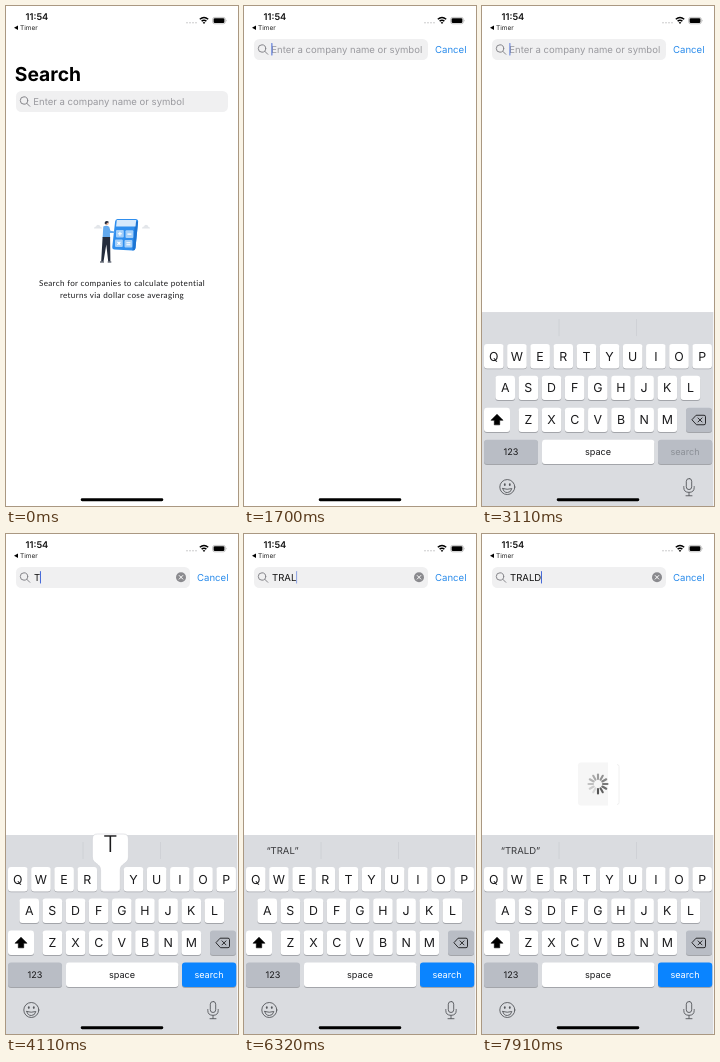
Write an HTML page that moves like this. It is 232 px wide and 500 px high and loops after 8000 ms.

```html
<!DOCTYPE html>
<html lang="en">
<head>
<meta charset="utf-8">
<title>Company search</title>
<style>
  html, body { margin: 0; width: 100%; height: 100%; overflow: hidden; background: #fff; }
  svg { display: block; width: 100%; height: 100%; font-family: Inter, "Liberation Sans", sans-serif; }
  text { text-rendering: geometricPrecision; }
  .mid { text-anchor: middle; }
  .intro { font: 8.1px Lato, sans-serif; letter-spacing: .32px; fill: #1c1c1e; }
  .body { font-size: 9.55px; }
</style>
</head>
<body>
<svg id="stage" viewBox="0 0 232 500">
  <rect width="232" height="500" fill="#fff"/>

  <g id="intro">
    <g fill="#e3e6ea">
      <path d="M88 222.500q0-2 2-2 .6-2 2.600-1.600 1.600.2 1.700 1.800 1.700 0 1.700 1.800z"/>
      <path d="M136 222.500q0-2 2-2 .6-2 2.600-1.600 1.600.2 1.700 1.800 1.700 0 1.700 1.800z"/>
    </g>
    <path d="M111.500 213h18q2.800 0 2.600 2.600l-2.600 26.500q-.3 2.700-3 2.500l-18-1.200q-2.500-.2-2.200-2.700l2.800-25.200q.3-2.500 2.400-2.500z" fill="#2f8eee"/>
    <path d="M132.100 215.500l-2.600 26.600q-.3 2.700-3 2.500l2.600-29z" fill="#1d74d2"/>
    <path d="M110.800 214h19.400l-.7 6.500h-19.400z" fill="#d6e9fc"/>
    <g fill="#a3cffa">
      <rect x="110" y="224" width="7.800" height="7.600" rx="1"/>
      <rect x="119.500" y="224.300" width="7.800" height="7.600" rx="1"/>
      <rect x="109" y="233.500" width="7.800" height="7.600" rx="1"/>
      <rect x="118.500" y="234" width="7.800" height="7.600" rx="1"/>
    </g>
    <path d="M111.900 227.800h4M113.900 225.800v4M121.400 228.100h4M111.400 235.800l3 3M114.400 235.800l-3 3M120.400 236.800h4M120.400 238.800h4" stroke="#fff" stroke-width="1.100" fill="none"/>
    <circle cx="100.800" cy="217.300" r="1.900" fill="#e8b9a0"/>
    <path d="M98.700 217.500q-.2-2.700 2.300-2.600 2 .1 1.800 1.700-2.200-.3-2.600 2z" fill="#232b3e"/>
    <path d="M97.300 220.500q3-1.400 5.900.2l1.200 4 4.400.9-.4 1.500-4.500-.1.200 5h-7.500z" fill="#62a9ee"/>
    <path d="M96.600 231h7.500l.3 24.500h-2.200l-1.900-17-2.800 17h-2.300z" fill="#242c3c"/>
    <path d="M94 256h4M101.700 256h3.600" stroke="#242c3c" stroke-width="1.200"/>
    <text class="mid intro" x="116" y="280.400">Search for companies to calculate potential</text>
    <text class="mid intro" x="116" y="291.900">returns via dollar cose averaging</text>
  </g>

  <text id="title" x="8.800" y="75" font-size="19.300" font-weight="700">Search</text>

  <g id="bar">
    <rect id="field" x="10" y="33" height="21" rx="5.500" fill="#f0f0f1"/>
    <g fill="none" stroke="#85858a" stroke-linecap="round">
      <circle cx="18" cy="42.500" r="3.700"/><path d="M20.800 45.300l3 3"/>
    </g>
    <text id="hint" class="body" x="27.300" y="47" fill="#9a9a9f">Enter a company name or symbol</text>
    <text id="query" class="body" x="28" y="47" fill="#111"></text>
    <rect id="caret" y="37" width="1" height="12.500" rx=".5" fill="#4468d8"/>
    <g id="clear">
      <circle cx="175" cy="43.300" r="5" fill="#8a8a8e"/>
      <path d="M173.200 41.500l3.600 3.600M176.800 41.500l-3.600 3.600" stroke="#fff" stroke-linecap="round"/>
    </g>
    <text id="cancel" x="191" y="46.500" font-size="9.600" fill="#2b8ceb">Cancel</text>
  </g>

  <g id="hud">
    <path d="M99 228.500h27v43h-27q-3 0-3-3v-37q0-3 3-3z" fill="#f6f6f6"/>
    <path d="M135 230.500q2 0 2 2v36q0 2-2 2" fill="none" stroke="#f0f0f0"/>
    <g id="rays" transform="translate(116 250)" stroke="#555" stroke-width="2.100" stroke-linecap="round"></g>
  </g>

  <g id="board"></g>

  <text x="19.600" y="14" font-size="9.300" font-weight="600" fill="#111">11:54</text>
  <path d="M8 21.700l4-2.200v4.400z"/>
  <text x="14" y="24" font-size="6.500" fill="#222">Timer</text>
  <g fill="#c4c4c6">
    <circle cx="181" cy="16.800" r=".8"/><circle cx="184" cy="16.800" r=".8"/>
    <circle cx="187" cy="16.800" r=".8"/><circle cx="190" cy="16.800" r=".8"/>
  </g>
  <path d="M193.800 13.300q4.200-3.600 8.400 0M195.600 15.200q2.400-2 4.800 0" fill="none" stroke="#000" stroke-width="1.500"/>
  <path d="M196.700 16.500q1.300-1 2.600 0l-1.300 1.400z"/>
  <rect x="206.700" y="11.400" width="12.600" height="6.400" rx="2" fill="none" stroke="#999" stroke-width=".6"/>
  <rect x="207.600" y="12.300" width="10.800" height="4.600" rx="1.200"/>
  <path d="M220 13.500q1 1 0 2.200z" fill="#999"/>
  <rect x="74.700" y="492.300" width="82.600" height="2.900" rx="1.450"/>
</svg>

<script>
const NS = 'http://www.w3.org/2000/svg';
const $ = id => document.getElementById(id);
const LOOP = 8000;

function add(parent, tag, attrs, text) {
  const el = document.createElementNS(NS, tag);
  for (const k in attrs) el.setAttribute(k, attrs[k]);
  if (text !== undefined) el.textContent = text;
  parent.appendChild(el);
  return el;
}
const set = (id, attrs) => { for (const k in attrs) $(id).setAttribute(k, attrs[k]); };
const show = (id, on) => set(id, { opacity: +on });
const clamp = v => Math.min(1, Math.max(0, v));
const ramp = (t, a, b) => clamp((t - a) / (b - a));
const easeOut = p => 1 - (1 - p) ** 3;

// Keyboard
const board = $('board'), keyAt = {};
const GREY = '#b9bdc5', INK = '#1a1a1c';

function key(x, y, w, fill = '#fff', id) {
  add(board, 'rect', { x, y: y + .9, width: w, height: 24.4, rx: 3, fill: '#a3a5aa' });
  add(board, 'rect', { x, y, width: w, height: 24.4, rx: 3, fill, ...(id && { id }) });
}
const label = (x, y, size, text, more) =>
  add(board, 'text', { x, y, 'font-size': size, class: 'mid', fill: INK, ...more }, text);

add(board, 'rect', { y: 301, width: 231.3, height: 210, fill: '#dadce0' });
for (const x of [77, 154.5])
  add(board, 'path', { d: `M${x} 308v17`, stroke: '#cccfd4', 'stroke-width': .8 });
const words = [38.5, 116, 193.5].map(x => label(x, 320, 9.5, '', { fill: '#36373a' }));

[['QWERTYUIOP', 11.8, 333], ['ASDFGHJKL', 23.2, 364.6], ['ZXCVBNM', 46.4, 396.6]].forEach(([row, x0, y]) =>
  [...row].forEach((c, i) => {
    const x = x0 + i * 23.15;
    keyAt[c] = { x, y };
    key(x - 9.8, y, 19.6);
    label(x, y + 16.6, 12.4, c);
  }));

key(2, 396.6, 26);
add(board, 'path', { d: 'M15 403.200l6 6h-3.300v4.600h-5.400v-4.600h-3.300z', 'stroke-linejoin': 'round', stroke: '#000', 'stroke-width': .6 });
key(204, 396.6, 26, GREY);
add(board, 'path', {
  d: 'M214.500 404.200h7.500q1.500 0 1.500 1.500v6.500q0 1.500-1.500 1.500h-7.500l-4.300-4.700zM216 406.900l4 4M220 406.900l-4 4',
  fill: 'none', stroke: INK, 'stroke-linejoin': 'round', 'stroke-linecap': 'round', 'stroke-width': .9
});
key(2, 428.6, 54, GREY);
label(29, 444, 9.1, '123');
key(60, 428.6, 112.4);
label(116, 443.6, 9.1, 'space');
key(176, 428.6, 54.2, GREY, 'go');
label(203, 443.6, 9.1, 'search', { id: 'goText' });

const line = { fill: 'none', stroke: '#55575c', 'stroke-linecap': 'round', 'stroke-width': .9 };
add(board, 'circle', { cx: 25.3, cy: 476, r: 7.5, ...line });
add(board, 'path', { d: 'M20.800 477.500q4.500 1.500 9 0q-.8 4-4.500 4t-4.500-4z', ...line });
for (const cx of [22.8, 27.8])
  add(board, 'ellipse', { cx, cy: 473.6, rx: .9, ry: 1.3, fill: '#55575c' });
add(board, 'rect', { x: 204.3, y: 467.5, width: 5.4, height: 11, rx: 2.7, ...line });
add(board, 'path', { d: 'M201.800 475.500v1q0 4.800 5.200 4.800t5.200-4.800v-1M207 481.500v3M204 484.700h6', ...line });

add(board, 'path', { id: 'pop', fill: '#fff', stroke: '#c9cbd0', 'stroke-width': .5 });
label(0, 0, 23, '', { id: 'popText', 'font-weight': 300 });

function popup(c) {
  show('pop', !!c);
  $('popText').textContent = c || '';
  if (!c) return;
  const { x, y } = keyAt[c], tall = y > 340 ? 3 : 0, h = 18 + tall;
  set('pop', {
    d: `M${x - 18} ${y - 28 - tall}q0-5 5-5h26q5 0 5 5v${h}c0 7-8.200 6-8.200 13v18.300q0 3-3 3h-13.600q-3 0-3-3v-18.300c0-7-8.200-6-8.200-13z`
  });
  set('popText', { x, y: y - 14.7 - tall / 2 });
}

// Spinner
const rays = Array.from({ length: 12 }, (_, i) =>
  add($('rays'), 'path', { d: 'M0-5v-4.500', transform: `rotate(${i * 30})` }));

// Each press: down, up, then the suggestions shown on release
const WORD = 'TRALD';
const presses = [
  [3900, 4320, 'THE', 'TO'],
  [4520, 4720, 'TRY', 'TRUE'],
  [5120, 5320, 'TRAY', 'TRAINED'],
  [5710, 6000],
  [6720, 6930]
];

// Caret: steady, fades out, fades back in
function blink(age) {
  const a = age % 1000;
  return 1 - ramp(a, 550, 700) + ramp(a, 900, 1000);
}

function draw(t) {
  const p = t < 1290 ? 0 : easeOut(ramp(t, 1160, 1620));
  set('title', { opacity: clamp(1 - p * 1.4), transform: `translate(0 ${-52 * p})` });
  set('intro', { opacity: clamp(1 - p * 1.3) });
  set('bar', { transform: `translate(0 ${52 * (1 - p)})` });
  set('field', { width: 212 - 38 * p });
  set('cancel', { x: 191 + 42 * (1 - p), opacity: p });

  const slide = t < 2500 ? 210 : t > 3300 ? 0 : 200 * Math.exp(-.0054 * (t - 2430));
  set('board', { transform: `translate(0 ${slide})` });

  const n = presses.filter(k => t >= k[0]).length;
  const done = presses.filter(k => t >= k[1]).length;
  $('query').textContent = WORD.slice(0, n);
  show('hint', !n);
  show('clear', n);
  set('go', { fill: n ? '#0a84ff' : GREY });
  set('goText', { fill: n ? '#fff' : '#8b8f96' });
  popup(n > done ? WORD[n - 1] : '');

  const tips = done ? [`“${WORD.slice(0, done)}”`, ...presses[done - 1].slice(2)] : [];
  words.forEach((w, i) => w.textContent = tips[i] || '');

  const width = n ? $('query').getComputedTextLength() : -.4;
  const since = n ? presses[n - 1][0] : 1540;
  set('caret', { x: 27.8 + width, opacity: t < 1600 ? 0 : blink(t - since) });

  show('hud', ramp(t, 7050, 7310));
  const head = Math.floor(t / 1000 * 12) + 8;
  rays.forEach((r, i) => r.setAttribute('opacity', 1 - .82 * ((head - i) % 12) / 11));
}

const start = performance.now();
function tick() {
  draw((performance.now() - start) % LOOP);
  requestAnimationFrame(tick);
}
tick();
</script>
</body>
</html>
```
